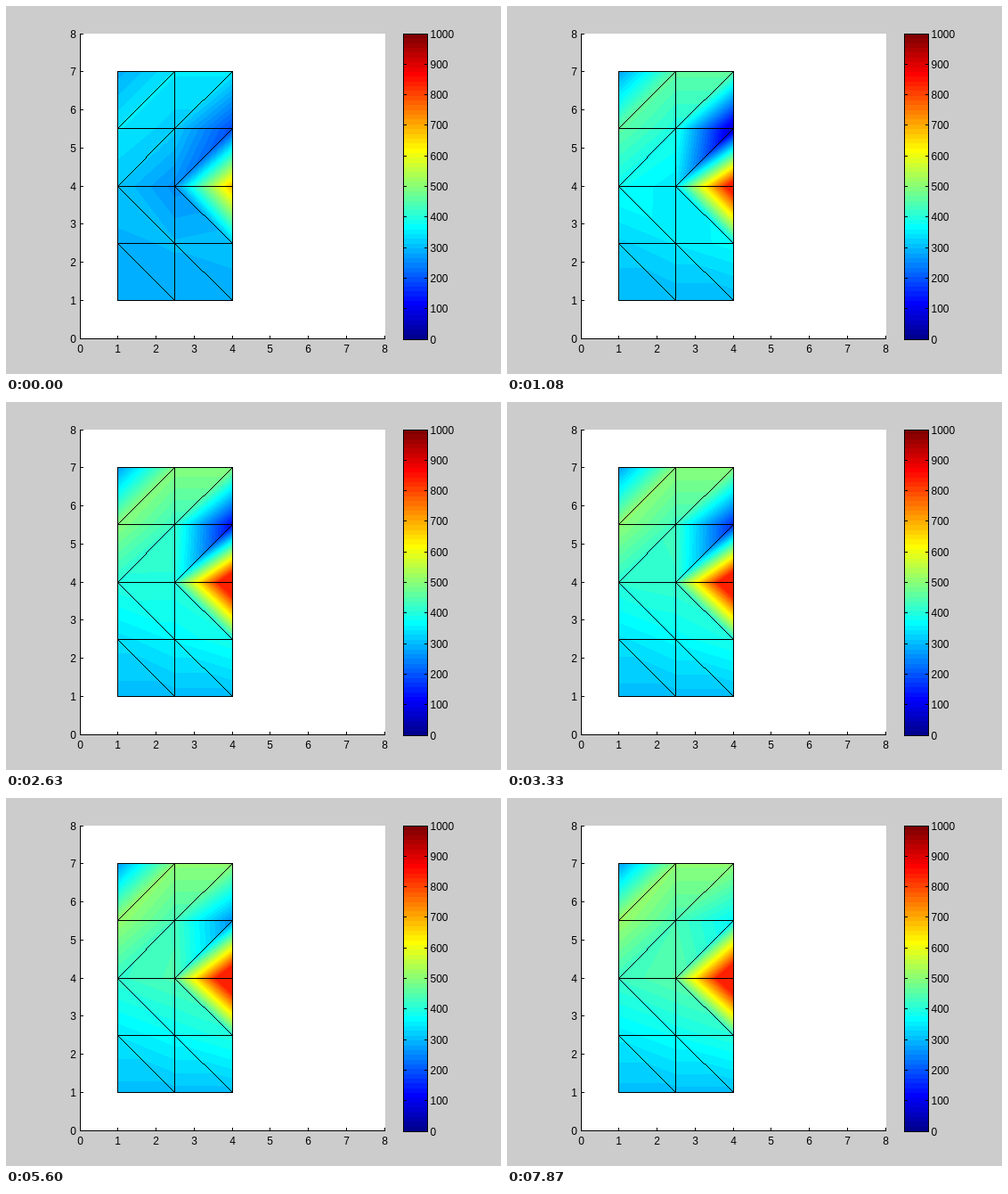
Recreate the animation shown at these times as an HTML page with a canvas. Size 556 px wide and 413 px high, loop 8000 ms.

```html
<!DOCTYPE html>
<html lang="en">
<head>
<meta charset="utf-8">
<title>Temperature on a triangular mesh</title>
<style>
  html, body { margin: 0; width: 100%; height: 100%; overflow: hidden; background: #ccc; }
  canvas, svg { position: absolute; left: 0; top: 0; display: block; }
  text { font: 12px "Liberation Sans", Arial, sans-serif; fill: #000; }
</style>
</head>
<body>
<canvas id="plot" width="556" height="413"></canvas>
<svg id="labels" width="556" height="413"></svg>
<script>
const ctx = document.getElementById('plot').getContext('2d');
const LOOP = 8000;
const HOT_LIMIT = 835;

const range = (n, fn) => Array.from({ length: n }, (_, i) => fn(i));
const clamp = (v, lo, hi) => Math.max(lo, Math.min(hi, v));
const plotX = x => Math.floor(83 + 42.75 * x);
const plotY = y => Math.floor(373 - 42.75 * y);
const COLS = range(3, c => plotX(1 + 1.5 * c));
const ROWS = range(5, r => plotY(1 + 1.5 * r));

// Nodes that do not follow the general profile, keyed by column and row
const KEY_NODES = {
  '2,2': { start: 690, settled: 1000, drift: 0, tau: 0.85 },
  '2,3': { start: 190, settled: -5, drift: 47, tau: 0.45 },
  '1,2': { start: 258, settled: 425, drift: 4, tau: 1.5 },
  '0,4': { start: 288, settled: 270, drift: 0, tau: 0.85 }
};

// Heat rises with height; the sideways slope alternates from row to row
function profileNode(c, r) {
  const settled = 305 + 200 * (Math.min(r, 3) / 3) ** 1.8
    + 28 * c * r * Math.sin(Math.PI * r / 2);
  return { start: 282 + 0.32 * (settled - 305), settled, drift: 0.7 * r * (4 - r), tau: 0.85 };
}

const NODES = range(5, r => range(3, c => KEY_NODES[`${c},${r}`] || profileNode(c, r)));

const temperature = ({ start, settled, drift, tau }, t) =>
  settled + drift * t + (start - settled) * Math.exp(-t / tau);

// Steady steps, with a longer hold once in every thirteen
const TIMES = [0];
for (let t = 210, i = 0; t < LOOP; i++) {
  TIMES.push(t);
  t += i % 13 === 11 ? 230 : 170;
}

// 64-step jet colour map over 0..1000
const ramp = j => Math.round(255 * clamp(Math.min(j, 48 - j) / 16, 0, 1));
const JET = range(64, i => [ramp(i - 23), ramp(i - 7), ramp(i + 9)]);
const jet = v => JET[clamp(Math.floor(v * 0.064), 0, 63)];

function line(x0, y0, x1, y1) {
  const n = Math.max(Math.abs(x1 - x0), Math.abs(y1 - y0));
  for (let i = 0; i <= n; i++)
    ctx.fillRect(Math.round(x0 + (x1 - x0) * i / n), Math.round(y0 + (y1 - y0) * i / n), 1, 1);
}

function drawAxes() {
  ctx.fillStyle = '#ccc';
  ctx.fillRect(0, 0, 556, 413);
  ctx.fillStyle = '#fff';
  ctx.fillRect(83, 31, 343, 343);
  const bandTop = i => Math.round(374 - i * 343 / 64);
  JET.forEach((rgb, i) => {
    ctx.fillStyle = `rgb(${rgb})`;
    ctx.fillRect(447, bandTop(i + 1), 27, bandTop(i) - bandTop(i + 1));
  });

  ctx.fillStyle = '#000';
  line(83, 31, 83, 373);
  line(83, 373, 425, 373);
  for (const y of [31, 374]) line(446, y, 473, y);
  for (const x of [446, 473]) line(x, 31, x, 374);

  let text = '';
  const label = (x, y, anchor, value) =>
    text += `<text x="${x}" y="${y}" text-anchor="${anchor}">${value}</text>`;
  for (let i = 0; i <= 8; i++) {
    const x = plotX(i), y = plotY(i);
    line(x, 370, x, 373);
    line(83, y, 86, y);
    label(x + 0.5, 389, 'middle', i);
    label(79, y + 5, 'end', i);
  }
  for (let i = 0; i <= 10; i++) {
    const y = Math.floor(374 - i * 34.3);
    line(446, y, 449, y);
    line(470, y, 473, y);
    label(476.5, y + 5, 'start', i * 100);
  }
  document.getElementById('labels').innerHTML = text;
}

function fillCell(field, c, r) {
  const x0 = COLS[c], y0 = ROWS[r + 1];
  const w = COLS[c + 1] - x0, h = ROWS[r] - y0;
  const [a, b] = field[r].slice(c), [d, e] = field[r + 1].slice(c);
  const img = ctx.createImageData(w, h);
  for (let y = 0, p = 0; y < h; y++) {
    const v = 1 - y / h;
    for (let x = 0; x < w; x++, p += 4) {
      const u = x / w;
      let value;
      if (r < 2) {
        value = u + v < 1 ? a + (b - a) * u + (d - a) * v
                          : e + (d - e) * (1 - u) + (b - e) * (1 - v);
      } else {
        value = u > v ? a + (b - a) * u + (e - b) * v
                      : a + (d - a) * v + (e - d) * u;
      }
      img.data.set(jet(Math.min(value, HOT_LIMIT)), p);
      img.data[p + 3] = 255;
    }
  }
  ctx.putImageData(img, x0, y0);
}

function drawMesh(ms) {
  const field = NODES.map(row => row.map(node => temperature(node, ms / 1000)));
  for (let r = 0; r < 4; r++)
    for (let c = 0; c < 2; c++) fillCell(field, c, r);

  ctx.fillStyle = '#000';
  for (const y of ROWS) line(COLS[0], y, COLS[2], y);
  for (const x of COLS) line(x, ROWS[4], x, ROWS[0]);
  for (let r = 0; r < 4; r++)
    for (let c = 0; c < 2; c++) {
      const down = r < 2 ? 1 : 0;
      line(COLS[c], ROWS[r + down], COLS[c + 1], ROWS[r + 1 - down]);
    }
}

const origin = performance.now();
let shown = -1;
function tick() {
  const t = (performance.now() - origin) % LOOP;
  const step = TIMES.findLastIndex(time => time <= t);
  if (step !== shown) {
    shown = step;
    drawMesh(TIMES[step]);
  }
  requestAnimationFrame(tick);
}

drawAxes();
tick();
</script>
</body>
</html>
```
